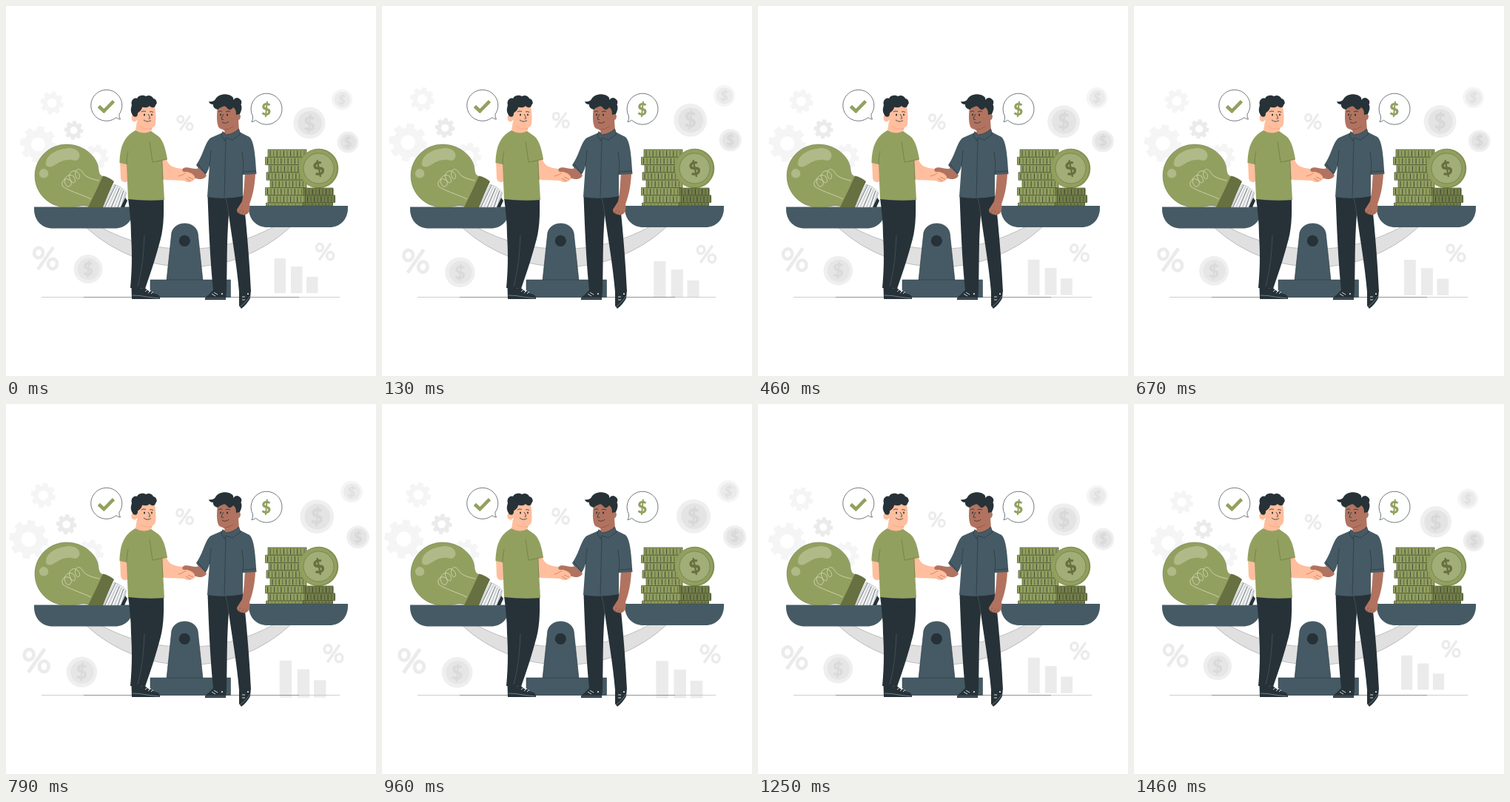
An HTML page with a canvas for the animation above (1.5 s loop, 500 by 500 pixels).

```html
<!DOCTYPE html>
<html lang="en">
<head>
<meta charset="utf-8">
<title>Balanced deal</title>
<style>
html, body { margin: 0; width: 100%; height: 100%; overflow: hidden; background: #fff; }
canvas { display: block; width: 500px; height: 500px; }
</style>
</head>
<body>
<canvas id="stage" width="500" height="500"></canvas>
<script>
const ctx = document.getElementById('stage').getContext('2d');
const GREEN = '#92a05f', DEEP = '#667040', SLATE = '#455a64', DARK = '#263238';
const PALE = '#ffbe9d', BROWN = '#b1735f', MIST = '#f5f5f5', FOG = '#ebebeb', ASH = '#e0e0e0';
const LOOP = 1500, STEP = 1000 / 24;

function shape(d, fill, line, width = 0.7) {
  const path = new Path2D(d);
  if (fill) { ctx.fillStyle = fill; ctx.fill(path); }
  if (line) { ctx.strokeStyle = line; ctx.lineWidth = width; ctx.stroke(path); }
}
const stroke = (d, color, width) => shape(d, null, color, width);

function oval(x, y, rx, ry, fill, line, width = 0.7, turn = 0) {
  ctx.beginPath();
  ctx.ellipse(x, y, rx, ry, turn, 0, Math.PI * 2);
  if (fill) { ctx.fillStyle = fill; ctx.fill(); }
  if (line) { ctx.strokeStyle = line; ctx.lineWidth = width; ctx.stroke(); }
}
const disc = (x, y, r, fill, line, width) => oval(x, y, r, r, fill, line, width);

function box(x, y, w, h, fill) {
  ctx.fillStyle = fill;
  ctx.fillRect(x, y, w, h);
}

function dollar(x, y, size, color, turn = 0) {
  ctx.save();
  ctx.translate(x, y);
  ctx.rotate(turn);
  ctx.font = `900 ${size}px Lato, sans-serif`;
  ctx.textAlign = 'center';
  ctx.fillStyle = color;
  ctx.fillText('$', 0, size * 0.36);
  ctx.restore();
}

function gear(x, y, r, hole, color, turn) {
  ctx.beginPath();
  for (let i = 0; i < 8; i++) {
    const a = turn + i * Math.PI / 4;
    for (const [da, k] of [[-0.26, 0.78], [-0.19, 1], [0.19, 1], [0.26, 0.78]]) {
      ctx.lineTo(x + Math.cos(a + da) * r * k, y + Math.sin(a + da) * r * k);
    }
  }
  ctx.closePath();
  ctx.fillStyle = color;
  ctx.fill();
  disc(x, y, hole, '#fff');
}

function percent(x, y, h, color) {
  ctx.save();
  ctx.translate(x, y);
  ctx.scale(h / 32, h / 32);
  oval(-9.5, -7.5, 6, 6.8, null, color, 4.4, 0.15);
  oval(9.5, 7.5, 6, 6.8, null, color, 4.4, 0.15);
  stroke('M10.5,-15 L-10.5,15', color, 4.6);
  ctx.restore();
}

function grayCoin(x, y, r, rim, face, sign, turn) {
  disc(x, y, r, rim);
  disc(x + r * 0.03, y, r * 0.76, face);
  dollar(x, y, r * 1.25, sign, turn);
}

function backdrop(scale) {
  ctx.save();
  ctx.translate(248, 250.5);
  ctx.scale(scale, scale);
  ctx.translate(-248, -250.5);
  gear(62, 131, 16, 6.3, MIST, 0.2);
  gear(91.5, 168, 13, 5, FOG, 0.1);
  gear(43.5, 187, 25, 9.5, MIST, 0.15);
  gear(122, 204, 17, 6.5, MIST, 0.2);
  percent(242, 158, 21, FOG);
  percent(53.5, 341, 32, FOG);
  percent(431, 332, 24, FOG);
  grayCoin(454, 126.5, 14, MIST, FOG, ASH, 0.15);
  grayCoin(410, 158, 21.5, '#efefef', '#e4e4e4', '#d8d8d8', 0);
  grayCoin(462, 184, 14.5, '#efefef', '#e4e4e4', '#d8d8d8', 0);
  grayCoin(111, 355.5, 19.5, '#efefef', '#e6e6e6', '#dadada', 0);
  box(362.5, 341, 15.5, 47, FOG);
  box(385, 352, 15.5, 36, FOG);
  box(406, 366, 15.5, 22, FOG);
  ctx.restore();
}

function scales() {
  stroke('M48,393.5 H451', '#c2c2c2', 0.8);
  stroke('M105,393.5 H396', '#7d868a', 0.8);
  shape('M108,299 A204,204 0 0 0 385,298 H362 A243,243 0 0 1 128,299 Z', ASH, '#a8a8a8');
  shape('M217,371 L223.5,310 C224,288.5 259,288.5 259.5,310 L266,371 Z', SLATE, DARK, 0.6);
  shape('M195,370 H303.5 V393.5 H195 Z', SLATE, DARK, 0.5);
  disc(241.3, 317.3, 7.6, DARK);
  for (const [x, y] of [[38, 271.5], [328, 270]]) {
    shape(`M${x},${y} h134 v3 c0,16 -11,26 -25,26 h-84 c-14,0 -25,-10 -25,-26 Z`, SLATE);
  }
}

function bulb() {
  shape('M82,187 C106,187 125,205 125,222 C126,227 127,229 132,231 L112,271 C104,268 96,272 82,272 C58,272 39,253 39,229.5 C39,206 58,187 82,187 Z', GREEN, DEEP, 0.5);
  shape('M54,212 C55,200 70,193 86,192 C101,192 103,207 94,209 C80,205 72,211 64,216 C58,219 53,217 54,212 Z', '#b0ba88');
  disc(51, 226.3, 6.2, '#b0ba88');
  stroke('M115,261 C100,254 83,249 77,244 C73,237 80,231 86,235 C92,240 85,248 81,242 C75,233 85,225 91,230 C97,237 91,243 87,235 C82,226 91,219 97,225 C103,231 97,238 94,230 C92,222 98,217 103,224 C106,231 116,234 126,236', '#dfe4cd', 0.7);
  shape('M131,229.5 Q139,231 146,237 Q139,252 131,272 H111 Q121,252 131,229.5 Z', DEEP);
  shape('M146,241 Q156,244 162.5,252 L159,272 H131.5 Z', '#f0f0f0', '#8b9398', 0.5);
  for (let i = 0; i < 6; i++) {
    const x = 148 + i * 2.7, y = 242 + i * 2;
    stroke(`M${x},${y} L${133.5 + i * 4.4},272`, i % 2 ? '#a2a9ad' : SLATE, 0.8);
  }
  shape('M161,259 L164,263 L160,272 H155 Z', DARK);
}

function stackCoin(x, y, w, h, fill) {
  box(x, y, w, h, fill);
  for (let i = 3; i < w; i += 4.6) {
    stroke(`M${x + i},${y + 1.5} v${h - 2.5}`, DARK, i % 3 < 1 ? 0.8 : 0.5);
  }
  stroke(`M${x},${y} h${w} v${h} h${-w} Z`, '#465029', 0.7);
}

function money() {
  const lefts = [354, 350.5, 355, 352, 357, 350.5, 354, 351.5];
  lefts.forEach((x, i) => {
    const y = 194 + i * 10.3;
    stackCoin(x, y, i === 4 ? 49 : 52, Math.min(10.3, 270 - y), GREEN);
  });
  disc(422.5, 219.5, 26.8, '#839052');
  disc(421.5, 219.5, 25.5, GREEN);
  disc(422.5, 219.5, 20.5, '#a2ae78', DEEP, 0.6);
  dollar(422.5, 219.5, 25, DEEP, -0.3);
  [402, 404.5, 401.5].forEach((x, i) => {
    const y = 246 + i * 9.8;
    stackCoin(x, y, 40, Math.min(9.8, 270 - y), '#737f47');
  });
}

function bubbles() {
  shape('M149,150.6 A21,21 0 1 1 153,146.3 Q152.5,150 154.5,153 Q151,153 149,150.6 Z', '#fff', DARK, 0.65);
  stroke('M125.3,135.5 L132.3,142 L145.5,128.7', GREEN, 4.6);
  shape('M337.5,154.3 A21,21 0 1 0 333.5,149 Q334,153.5 332,156.5 Q335.5,156.3 337.5,154.3 Z', '#fff', DARK, 0.65);
  dollar(351.7, 140, 22, GREEN);
}

function partnerLeft() {
  // legs and shoe
  shape('M169.5,379 L185,378 Q192,387 205,390 Q209,393 208,396 H170 Z', DARK);
  stroke('M171,391 Q182,391 190,393 L207,395', '#73808a', 1);
  stroke('M188,386 l5,-4 M192,388 l4,-4 M196,389 l3,-3', '#fff', 0.8);
  disc(183, 381, 0.9, '#fff');
  shape('M165,260 H213 C213.5,284 213,303 207,322 C201,344 195,362 188,382 L168,381 C171,350 170,328 169,310 C169,292 167,275 165,260 Z', DARK);
  stroke('M187,310 Q186,349 178,379', '#52616a', 0.6);
  // arms
  shape('M154,209 L165,211 L165,237 Q157,240 155,233 Z', PALE);
  shape('M198,211 L217,207 C219,217 229,219 238,220 L248,223 C256,226 258,231 255,234 C252,238 245,239 241,236 C228,235 213,236 207,233 C201,229 199,219 198,211 Z', PALE);
  // shirt
  shape('M175,168 Q185,173 196,169 L206,176 C213,182 216,195 218,207 L211,209 L214,262 Q190,264 165,261 L163,214 L153.5,212 C154,193 158,177 175,168 Z', GREEN);
  stroke('M163,214 Q163,203 165,196 M194,183 L198,211 L218,207 M211,209 L212,235', DEEP, 0.6);
  // head
  shape('M177,156 L198,160 L197,168 Q187,175 175,168 Z', PALE);
  shape('M175,137 Q186,130 201,135 C203,147 203,158 201,162 C197,167 187,167 181,162 Q175,155 175,137 Z', PALE);
  stroke('M182,163 Q189,168 198,165', '#ed9c7c', 0.6);
  oval(173.5, 151.5, 4, 5, PALE);
  shape('M172,149 C167,142 169,138 170,134 C168,128 173,123 177,125 C179,120 186,120 189,122 C194,119 199,123 199,125 C204,126 205,132 202,134 C202,138 196,138 194,135 C190,139 186,136 184,137 C183,142 179,143 178,145 C178,149 176,151 172,149 Z', DARK);
  stroke('M183,143 q3,-2 6,-0.5 M194,143 q3,-1 5,0.5 M192,146 Q195,150 194.5,152 l-2,0.5 M186,154 Q191,158 196,154.5', DARK, 0.8);
  oval(187, 147, 1, 1.5, DARK);
  oval(197, 147, 0.9, 1.4, DARK);
}

function partnerRight() {
  // shoes and legs
  shape('M281,383 L298,384 L297,397 H269 Q268,394 273,391 Z', DARK);
  shape('M315,385 L331,384 L330,395 Q325,404 318,409 L315,405 Z', DARK);
  stroke('M270,395 H297 M317,406 Q325,400 330,392', '#73808a', 0.8);
  stroke('M278,389 l5,3 M281,387 l5,3 M319,397 h4 M319,393 h4', '#fff', 0.8);
  disc(292, 389, 1, '#fff');
  disc(327, 389, 1, '#fff');
  shape('M272.5,256 H320.5 C324,287 329,340 331,385 L315,386 C312,350 305,312 301,282 C298,319 299,350 298,384 L280,384 C276,345 274,300 272.5,256 Z', DARK);
  stroke('M301,283 Q300,270 297,260', '#52616a', 0.6);
  // hanging arm
  shape('M323,226 L337,227 C336,245 333,257 329,268 C331,278 326,284 319,282 Q311,280 312,275 L319,264 C322,250 322,237 323,226 Z', BROWN);
  stroke('M317,275 l-2,5 M321,276 l-2,6 M325,277 l-2,5', '#884f40', 0.6);
  // shirt
  shape('M293,171 L277,178 C269,183 267,201 257,215 L268,230 Q273,224 275,216 L272,258 Q295,262 320,257 V228 L338.5,227 C337,207 336,183 329,177 L313,169 Z', SLATE);
  stroke('M275,216 L277,195 M320,228 Q322,212 319,197 M297,181 L295,258 M259,213 L270,227 M321,224 L338,223', DARK, 0.6);
  // head
  shape('M294,158 L314,152 L315,170 Q304,178 296,176 Z', BROWN);
  shape('M286,135 H313 C315,148 313,159 307,163 C301,169 289,168 287,163 C284,155 285,145 286,135 Z', BROWN);
  stroke('M293,167.3 Q301,167.5 307,163', '#8b5141', 0.7);
  shape('M293,169.5 L297,174 Q308,173 314.5,166 L317,173 L306,181 L297,178 L295.5,182 L291,175 Z', SLATE, DARK, 0.6);
  oval(313.3, 149.5, 3.6, 4.8, BROWN);
  shape('M286,140 Q279,138 280,133 Q275,133 274,129 Q280,130 283,126 C286,119 299,117 305,122 Q308,124 307,127 Q311,122 315,125 Q320,128 317.5,133 Q320,138 316,146 L311,147 Q311,139 307,137 Q303,143 299,138 Q296,134 293,136 Q289,137 286,140 Z', DARK);
  stroke('M287,143 q3,-2 5,-0.5 M297,143 q3,-2 6,0 M294,146 Q291,151 291,153 l3,0.5 M292,157 Q297,160 301,156', DARK, 0.8);
  oval(290, 147, 0.9, 1.4, DARK);
  oval(299, 147, 1, 1.5, DARK);
}

function handshake() {
  shape('M239,220 C243,216 251,220 257,220 L261,219 L271,229 C269,234 262,235 257,233 C250,232 246,229 242,227 C238,224 238,221 239,220 Z', BROWN);
  shape('M233,223 L244,224 C250,225 257,229 255,234 C252,238 245,239 241,236 L232,233 Z', PALE);
  shape('M240,219 C244,217 249,221 248,224 L241,224 C238,223 238,221 240,219 Z', BROWN);
  stroke('M233,230 Q239,229 243,225 M246,231 l7,3 M243,233 l7,4', '#c46c4f', 0.65);
}

// Two beats per loop: three quick legs and a slow settle.
function pulse(phase) {
  if (phase < 900) {
    const p = phase % 600;
    return 1 + 0.1 * (p < 300 ? p : 600 - p) / 300;
  }
  return 1 + 0.1 * (LOOP - phase) / 600;
}

function draw(ms) {
  const tick = Math.floor((ms % LOOP + 2.5) / STEP);
  const phase = (tick + 1) * STEP % LOOP;
  box(0, 0, 500, 500, '#fff');
  backdrop(pulse(phase) / pulse(STEP));
  scales();
  bulb();
  money();
  bubbles();
  partnerLeft();
  partnerRight();
  handshake();
}

const start = performance.now();
function play(now) {
  draw(Math.max(0, now - start));
  requestAnimationFrame(play);
}
draw(0);
requestAnimationFrame(play);
</script>
</body>
</html>
```
